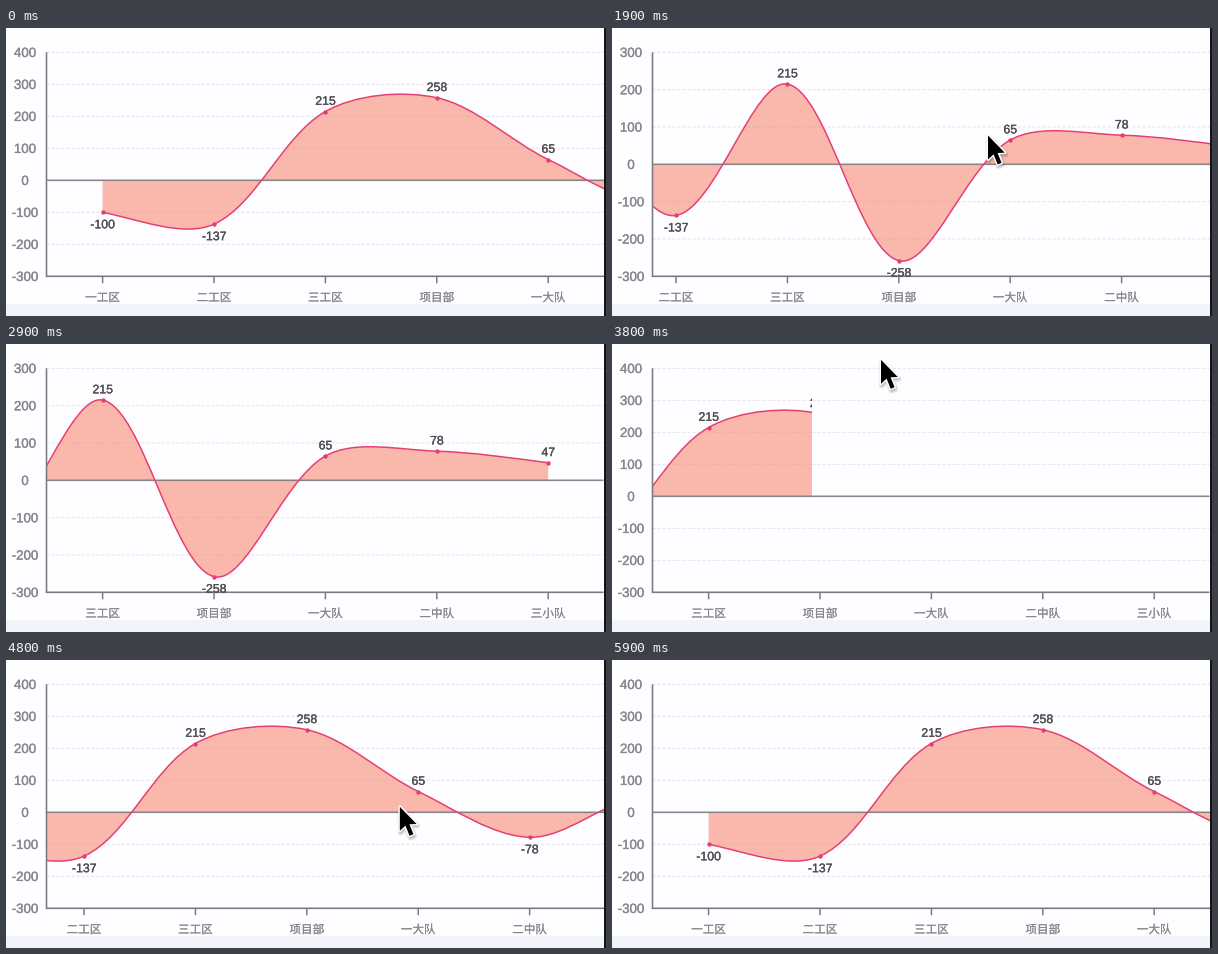
These frames come from a looping animation (600 px wide and 288 px high, 6.1 s). A matplotlib script:

```python
import numpy as np
import matplotlib.pyplot as plt
from matplotlib.animation import FuncAnimation
from matplotlib.patches import PathPatch, Polygon, Rectangle
from matplotlib.patheffects import withStroke
from matplotlib.path import Path

W, H, DPI = 600, 288, 100
STEP, LOOP = 100, 6100
PX = 72 / DPI

LEFT, RIGHT, TOP, BOTTOM = 40.5, 598, 24.3, 248.3
COL = 111.4
FIRST = 96.6
SMOOTH = 0.33

TEAMS = ["一工区", "二工区", "三工区", "项目部", "一大队", "二中队", "三小队"]
MIXED = dict(values=[-100, -137, 215, 258, 65, -78, 47], top=400)
SWINGS = dict(values=[121, -137, 215, -258, 65, 78, 47], top=300)
LOW = -300
MAX_SCROLL = 2 * COL

PAPER, BAND = "#fefdff", "#f1f4fa"
GRID, AXIS, AXIS_TEXT = "#e2e0e7", "#7b7a80", "#88878d"
CURVE, AREA, VALUE_TEXT = "#e53f72", "#f88a75", "#4f4e52"

REVEAL_SPEED = 0.982  # pixels per millisecond

ARROW = np.array([(0, 0), (0, 24), (5.6, 18.8), (9.7, 29),
                  (13.6, 27.4), (9.6, 17.5), (16.8, 17.2)])


def ease(t, start, end):
    u = np.clip((t - start) / (end - start), 0, 1)
    return u * u * (3 - 2 * u)


def blend(a, b, u):
    return a + (b - a) * u


def scroll_at(t):
    """Drag past the right end, spring back, then drag past the left end."""
    if t < 2200:
        return 288 * ease(t, 1600, 2200)
    if t < 4300:
        return blend(288, MAX_SCROLL, ease(t, 2200, 2900))
    if t < 5500:
        return blend(MAX_SCROLL, -24, ease(t, 4300, 5500))
    return blend(-24, 0, ease(t, 5500, 5900))


def reveal_at(t):
    """Width of the uncovered part of the plot."""
    full = RIGHT - LEFT
    if 700 <= t < 1400:
        return min(full, (t - 700) * REVEAL_SPEED)
    if 3400 <= t < 4400:
        return np.clip((t - 3638) * REVEAL_SPEED, 0, full)
    return full


def pointer_at(t):
    """Tip of the mouse pointer, or None while it is away."""
    if 1500 <= t <= 2300:
        if 1600 <= t <= 2200:
            return 520 - scroll_at(t), blend(120, 95, ease(t, 1600, 2200))
        times = [1500, 1600, 2200, 2300]
        return (np.interp(t, times, [310, 520, 232, 284]),
                np.interp(t, times, [17, 120, 95, 16.7]))
    if 3800 <= t < 4300:
        u = ease(t, 3800, 4300)
        return blend(269, 301, u), blend(15.8, 160, u)
    if 4300 <= t <= 5500:
        return 301 + MAX_SCROLL - scroll_at(t), np.interp(t, [4300, 4800], [160, 146.8])
    return None


def smooth_path(pts, zero):
    """Bezier vertices and codes; the ends bend as if zeros lay beyond them."""
    before_first = (pts[0][0] - COL, zero)
    after_last = (pts[-1][0] + COL, zero)
    padded = np.vstack([before_first, pts, after_last])
    chords = padded[2:] - padded[:-2]
    gaps = np.hypot(*np.diff(padded, axis=0).T)
    share = (gaps[1:] / (gaps[1:] + gaps[:-1]))[:, None]
    arrive = pts - chords * SMOOTH * (1 - share)
    leave = pts + chords * SMOOTH * share

    verts, codes = [pts[0]], [Path.MOVETO]
    for i in range(1, len(pts)):
        verts += [leave[i - 1], arrive[i], pts[i]]
        codes += [Path.CURVE4] * 3
    return verts, codes


fig = plt.figure(figsize=(W / DPI, H / DPI), dpi=DPI, facecolor=PAPER)
ax = fig.add_axes([0, 0, 1, 1])


def box(x, y, w, h, color, z):
    ax.add_patch(Rectangle((x, y), w, h, color=color, lw=0, zorder=z))


def line(xs, ys, color, width, z, **kw):
    return ax.plot(xs, ys, color=color, lw=width * PX, zorder=z, snap=False,
                   solid_capstyle="butt", **kw)[0]


def write(x, baseline, text, size, color, z, font, weight):
    """Centred text, thickened by a hairline stroke of the given width."""
    return ax.text(x, baseline, text, fontsize=size * PX, color=color, family=font,
                   ha="center", va="baseline", zorder=z, clip_on=True,
                   path_effects=[withStroke(linewidth=weight * PX, foreground=color)])


def number(x, middle, value, size, color, z):
    return write(x, middle + size * 0.35, str(value), size, color, z,
                 "Liberation Sans", 0.3)


def clip_box(width):
    return Rectangle((LEFT, 0), width, H, transform=ax.transData)


def draw_axes(top, to_y, shift):
    start = max(LEFT, LEFT - shift)
    end = min(RIGHT, LEFT + len(TEAMS) * COL - shift)
    for value in range(LOW, top + 1, 100):
        y = to_y(value)
        number(19, y, value, 13.3, AXIS_TEXT, 6)
        if value not in (0, LOW):
            line([start, end], [y, y], GRID, 1, 1, dashes=(3, 2))
    line([start, end], [to_y(0)] * 2, AXIS, 1.6, 3, alpha=0.9)
    line([start, end], [BOTTOM] * 2, AXIS, 1.6, 3)
    line([LEFT, LEFT], [TOP, BOTTOM + 0.8], AXIS, 1.6, 6)

    window = clip_box(RIGHT - LEFT)
    for i, team in enumerate(TEAMS):
        x = FIRST + i * COL - shift
        if LEFT < x < RIGHT:
            line([x, x], [BOTTOM, BOTTOM + 7], AXIS, 1.5, 3)
        name = write(x, 273.3, team, 11.6, AXIS_TEXT, 4, "Noto Sans CJK JP", 0.1)
        name.set_clip_path(window)


def draw_series(values, to_y, shift, width):
    pts = np.array([(FIRST + i * COL - shift, to_y(v)) for i, v in enumerate(values)])
    zero = to_y(0)
    verts, codes = smooth_path(pts, zero)
    area = Path(verts + [(pts[-1][0], zero), (pts[0][0], zero), pts[0]],
                codes + [Path.LINETO, Path.LINETO, Path.CLOSEPOLY])
    parts = [
        ax.add_patch(PathPatch(area, fc=AREA, ec="none", lw=0, alpha=0.6, zorder=2)),
        ax.add_patch(PathPatch(Path(verts, codes), fc="none", ec=CURVE,
                               lw=1.5 * PX, zorder=4)),
        line(pts[:, 0], pts[:, 1], "none", 0, 5, marker="o", ms=4.4 * PX,
             mfc=CURVE, mec="none"),
    ]
    for (x, y), value in zip(pts, values):
        gap = -11 if value > 0 else 11.7
        parts.append(number(x, y + gap, value, 12.3, VALUE_TEXT, 5))
    window = clip_box(width)
    for part in parts:
        part.set_clip_path(window)


def draw_pointer(tip):
    shape = ARROW + tip
    for spread in (6, 4, 2):
        ax.add_patch(Polygon(shape + (0.8, 2), fc="black", ec="black", alpha=0.07,
                             lw=spread * PX, joinstyle="round", zorder=8))
    ax.add_patch(Polygon(shape, fc="white", ec="white", lw=3 * PX,
                         joinstyle="round", zorder=9))
    ax.add_patch(Polygon(shape, fc="black", ec="none", zorder=10))


def draw(frame):
    t = frame * STEP
    ax.cla()
    ax.set_xlim(0, W)
    ax.set_ylim(H, 0)
    ax.axis("off")

    box(0, 0, W, H, PAPER, 0)
    box(0, 276, W, 12, BAND, 0.5)
    box(598.4, 0, 2, H, "#151515", 7)

    chart = SWINGS if 700 <= t < 3400 else MIXED
    top = chart["top"]

    def to_y(value):
        return BOTTOM - (value - LOW) * (BOTTOM - TOP) / (top - LOW)

    shift = scroll_at(t)
    draw_axes(top, to_y, shift)
    draw_series(chart["values"], to_y, shift, reveal_at(t))
    tip = pointer_at(t)
    if tip is not None:
        draw_pointer(tip)
    return []


anim = FuncAnimation(fig, draw, frames=LOOP // STEP, interval=STEP,
                     init_func=lambda: [], repeat=True, repeat_delay=0)
plt.show()
```
